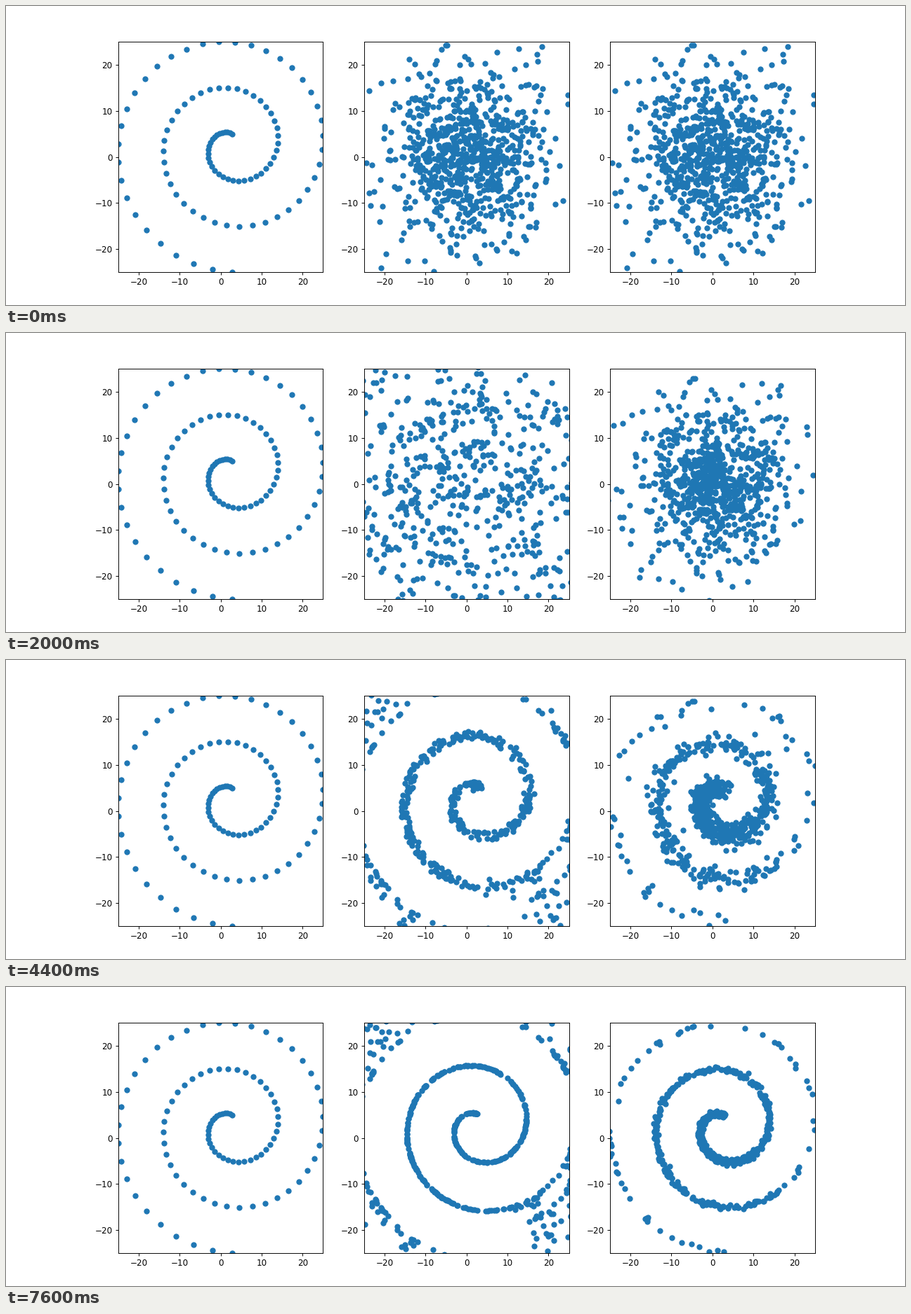
Animation, 1280 px wide and 427 px high, one loop 8 s. Source, as a matplotlib script:

```python
import numpy as np
import matplotlib.pyplot as plt
from matplotlib.animation import FuncAnimation

FRAMES, INTERVAL = 20, 400
LIMIT = 25
COUNT = 800
DECAY = 0.84       # noise level ratio from one frame to the next
SPREAD = 3         # frames during which the overshooting cloud expands


def rescale(values):
    """Map values linearly onto [-LIMIT, LIMIT]."""
    low, high = values.min(), values.max()
    return LIMIT * (2 * (values - low) / (high - low) - 1)


def make_spiral(count):
    theta = np.linspace(np.pi / 2, 5.5 * np.pi, count)
    return np.column_stack([rescale(theta * np.cos(theta)),
                            rescale(theta * np.sin(theta))])


def denoise(points, data, sigma):
    """Gaussian-weighted mean of the data as seen from each point."""
    dist = ((points[:, None] - data[None]) ** 2).sum(axis=2)
    logits = -(dist - dist.min(axis=1, keepdims=True)) / (2 * sigma ** 2)
    weights = np.exp(logits)
    return weights @ data / weights.sum(axis=1, keepdims=True)


def radius(points):
    return np.linalg.norm(points, axis=1, keepdims=True)


def exact_track(start, data):
    """Shrink the noise around the denoised estimate, frame by frame."""
    track = [start]
    for i in range(FRAMES - 1):
        points = track[-1]
        mean = denoise(points, data, 7 * DECAY ** i)
        track.append(mean + DECAY * (points - mean))
    return track


def overshoot_track(start, data):
    """Blow the cloud up first, then settle on a slightly inflated spiral."""
    track = [start * s for s in np.linspace(1, 2.15, SPREAD + 1)]
    for i in range(SPREAD, FRAMES - 1):
        points = track[-1]
        extra = 0.06 * 0.8 ** max(i - 8, 0)
        target = data * (1 + 0.002 * radius(data) + extra)
        mean = denoise(points, target, max(2 * DECAY ** (i - SPREAD), 0.5))
        # Points beyond the outer arm are hardly pulled back.
        beyond = (radius(points) > radius(mean)) & (radius(mean) > 19)
        pull = np.interp(i, [SPREAD, 9], [0.1, 0.28])
        keep = np.where(beyond, 0.97, 1 - pull)
        track.append(mean + keep * (points - mean))
    return track


rng = np.random.default_rng(4)
cloud = rng.normal(0, 9.4, (COUNT, 2))
curve = make_spiral(400)
tracks = [overshoot_track(cloud, curve), exact_track(cloud, curve)]

fig, axes = plt.subplots(1, 3, figsize=(15, 427 * 15 / 1280), dpi=1280 / 15)
fig.subplots_adjust(left=0.12475, right=0.89975)
ticks = range(-20, 21, 10)
for ax in axes:
    ax.set(xlim=(-LIMIT, LIMIT), ylim=(-LIMIT, LIMIT),
           xticks=ticks, yticks=ticks)

axes[0].plot(*make_spiral(100).T, "o", color="C0", snap=False)
dots = [ax.plot([], [], "o", color="C0", snap=False)[0] for ax in axes[1:]]


def update(frame):
    for line, track in zip(dots, tracks):
        line.set_data(*track[frame].T)
    return dots


anim = FuncAnimation(fig, update, frames=FRAMES, interval=INTERVAL,
                     repeat=True, repeat_delay=0)
plt.show()
```
